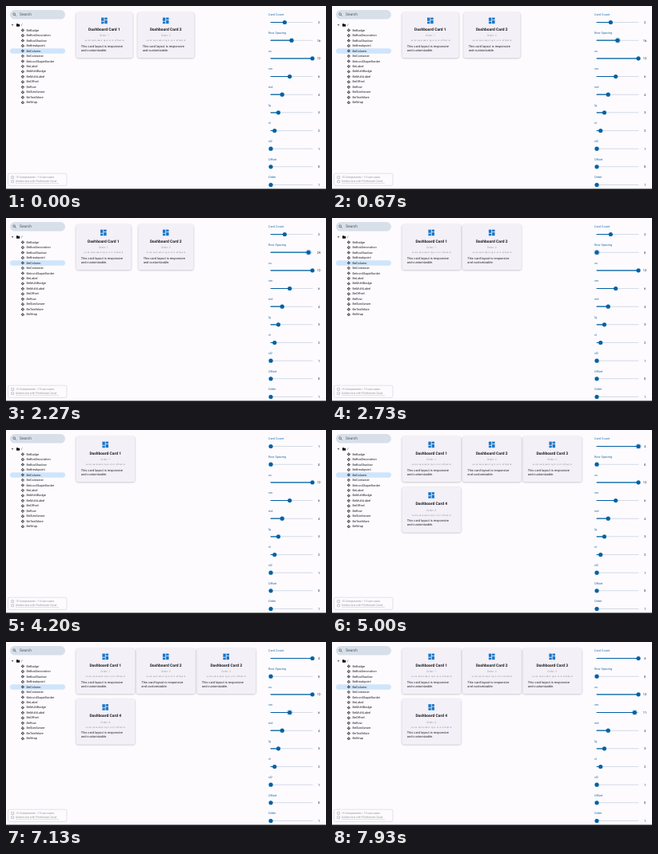
Write an HTML page with a canvas that moves like this. It is 400 by 231 pixels and loops after 8 s.

```html
<!DOCTYPE html>
<html lang="en">
<head>
<meta charset="utf-8">
<title>Column layout preview</title>
<style>
html, body { margin: 0; width: 100%; height: 100%; overflow: hidden; background: #fdfbfe; }
canvas { display: block; width: 400px; height: 231px; }
</style>
</head>
<body>
<canvas></canvas>
<script>
const LOOP = 8000;
const BLUE = '#0061a4', INK = '#24252a', MUTED = '#8c8d93';
const ITEMS = ['BeBadge', 'BeBoxDecoration', 'BeBoxShadow', 'BeBreakpoint', 'BeColumn',
  'BeContainer', 'BeIconShapeBorder', 'BeLabel', 'BeMultiBadge', 'BeMultiLabel',
  'BeOffset', 'BeRow', 'BeSizeAware', 'BeTextMore', 'BeWrap'];

// Each track lists [time, value]; a value holds until the next entry.
const SPACING = [[0, 16], [1070, 17], [1130, 18], [1200, 19], [1270, 20], [1400, 24], [1530, 28],
  [1600, 32], [2270, 29], [2330, 24], [2400, 17], [2470, 9], [2530, 3], [2730, 0]];
const COUNT = [[0, 2], [4000, 1], [4800, 2], [4870, 3], [4930, 4]];
const SM = [[0, 6], [7200, 7], [7270, 8], [7400, 9], [7530, 10], [7600, 11]];

const canvas = document.querySelector('canvas');
const ctx = canvas.getContext('2d');
const ratio = window.devicePixelRatio || 1;
canvas.width = 400 * ratio;
canvas.height = 231 * ratio;

const valueAt = (track, t) => track.filter(([start]) => start <= t).pop()[1];
const between = (t, start, end) => t >= start && t < end;

function text(str, x, y, size, color, { align = 'left', weight = 400, family = 'Roboto, sans-serif' } = {}) {
  ctx.font = `${weight} ${size}px ${family}`;
  ctx.textAlign = align;
  ctx.fillStyle = color;
  ctx.fillText(str, x, y);
}

function box(x, y, w, h, r, fill) {
  ctx.beginPath();
  ctx.roundRect(x, y, w, h, r);
  ctx.fillStyle = fill;
  ctx.fill();
}

function disc(x, y, r, fill) {
  ctx.beginPath();
  ctx.arc(x, y, r, 0, 7);
  ctx.fillStyle = fill;
  ctx.fill();
}

function polygon(points, fill) {
  ctx.beginPath();
  points.forEach(([x, y]) => ctx.lineTo(x, y));
  ctx.fillStyle = fill;
  ctx.fill();
}

function diamond(x, y, r, fill) {
  polygon([[x - r, y], [x, y - r], [x + r, y], [x, y + r]], fill);
}

function outline(x, y, w, h, r, color) {
  ctx.beginPath();
  ctx.roundRect(x, y, w, h, r);
  ctx.strokeStyle = color;
  ctx.lineWidth = 0.5;
  ctx.stroke();
}

function sidebar() {
  box(5, 5, 69, 11.6, 5.8, '#d7dfe9');
  ctx.strokeStyle = '#43474e';
  ctx.lineWidth = 0.6;
  ctx.beginPath();
  ctx.arc(10.2, 10.2, 1.4, 0, 7);
  ctx.moveTo(11.2, 11.2);
  ctx.lineTo(12.7, 12.7);
  ctx.stroke();
  text('Search', 17, 10.9, 4.9, '#51565e');

  polygon([[6.8, 23.3], [9.4, 23.3], [8.1, 24.8]], INK);
  box(13, 22.2, 2, 1.4, 0.4, '#111');
  box(13, 22.7, 4.2, 3.1, 0.4, '#111');
  text('/', 19, 24.2, 4, INK);

  box(5, 53.2, 69, 6.6, 3.3, '#cfe5fb');
  ITEMS.forEach((name, i) => {
    const y = 30.5 + i * 6.48;
    for (const [dx, dy] of [[-1, 0], [1, 0], [0, -1], [0, 1]])
      diamond(20.9 + dx * 1.2, y + dy * 1.2, 0.95, '#2b2c31');
    text(name, 25.5, y, 3.93, INK);
  });

  outline(2.5, 210.2, 73.5, 15.2, 2, '#c6c7cc');
  outline(6.7, 213.6, 3, 3, 0.5, MUTED);
  outline(6.7, 218.8, 3, 3, 0.5, MUTED);
  text('15 Components • 15 use-cases', 12, 215.3, 3.5, MUTED);
  text('Golden test with Plinthmark Cloud', 12, 220.4, 3.4, MUTED);
  box(12, 222, 54, 0.35, 0, MUTED);
}

function card(index, spacing, sm) {
  const gap = spacing / 4;
  const width = 74 - gap * 2 / 3;
  const x = 87.4 + (index % 3) * (75.5 + gap / 3);
  const y = 8 + Math.floor(index / 3) * 63.5;
  const mid = x + width / 2 - 0.2;

  ctx.save();
  ctx.shadowColor = 'rgba(0,0,0,.28)';
  ctx.shadowBlur = 2 * ratio;
  ctx.shadowOffsetY = 0.5 * ratio;
  box(x, y, width, 57.2, 3, '#f3f0f8');
  ctx.restore();

  const left = mid - 3.8, top = y + 6.6;
  for (const [dx, dy, h] of [[0, 0, 4.2], [0, 5, 2.6], [4.2, 0, 2.6], [4.2, 3.4, 4.2]])
    box(left + dx, top + dy, 3.4, h, 0, '#1976c8');

  const center = { align: 'center' };
  const number = index + 1;
  text(`Dashboard Card ${number}`, mid, y + 21.4, 4.95, '#1b1b1f', { ...center, weight: 700 });
  text(`Order: ${number}`, mid, y + 29.2, 3.4, '#a3a2a8', center);
  text(`xs:12 sm:${sm} md:4 lg:3 xl:2 offset:0`, mid, y + 35.6, 2.4, '#77777d',
    { ...center, family: '"DejaVu Sans Mono", monospace' });
  text('This card layout is responsive', x + 6.4, y + 42.5, 3.97, INK);
  text('and customizable.', x + 6.4, y + 47.4, 3.97, INK);
}

function slider(row, label, value, min, max, active) {
  const y = 20.5 + row * 22.67;
  const x = 331 + 52 * (value - min) / (max - min);
  text(label, 328, y - 9.3, 3.85, '#1a6eae');
  box(330.5, y - 0.5, 53, 1, 0.5, '#d3dae5');
  box(330.5, y - 0.6, x - 330.5, 1.2, 0.6, BLUE);
  if (active) disc(x, y, 4, 'rgba(0,97,164,.14)');
  disc(x, y, 2.6, BLUE);
  text(value, 391, y + 0.2, 4, INK, { align: 'center' });
}

function draw(t) {
  const spacing = valueAt(SPACING, t);
  const count = valueAt(COUNT, t);
  const sm = valueAt(SM, t);

  ctx.setTransform(ratio, 0, 0, ratio, 0, 0);
  ctx.textBaseline = 'middle';
  ctx.textRendering = 'geometricPrecision';
  box(0, 0, 400, 231, 0, '#fdfbfe');
  sidebar();
  for (let i = 0; i < count; i++) card(i, spacing, sm);

  slider(0, 'Card Count', count, 1, 4, between(t, 3870, 4130) || between(t, 4800, 5670));
  slider(1, 'Row Spacing', spacing, 0, 32, between(t, 670, 2000) || between(t, 2270, 3130));
  const spans = { xs: 12, sm, md: 4, lg: 3, xl: 2, xl2: 1 };
  Object.entries(spans).forEach(([name, value], i) =>
    slider(i + 2, name, value, 1, 12, name === 'sm' && t >= 7130));
  slider(8, 'Offset', 0, 0, 12);
  slider(9, 'Order', 1, 1, 12);

  box(0, 229.4, 400, 1.6, 0, '#17181b');
}

function tick() {
  draw(performance.now() % LOOP);
  requestAnimationFrame(tick);
}
tick();
</script>
</body>
</html>
```
